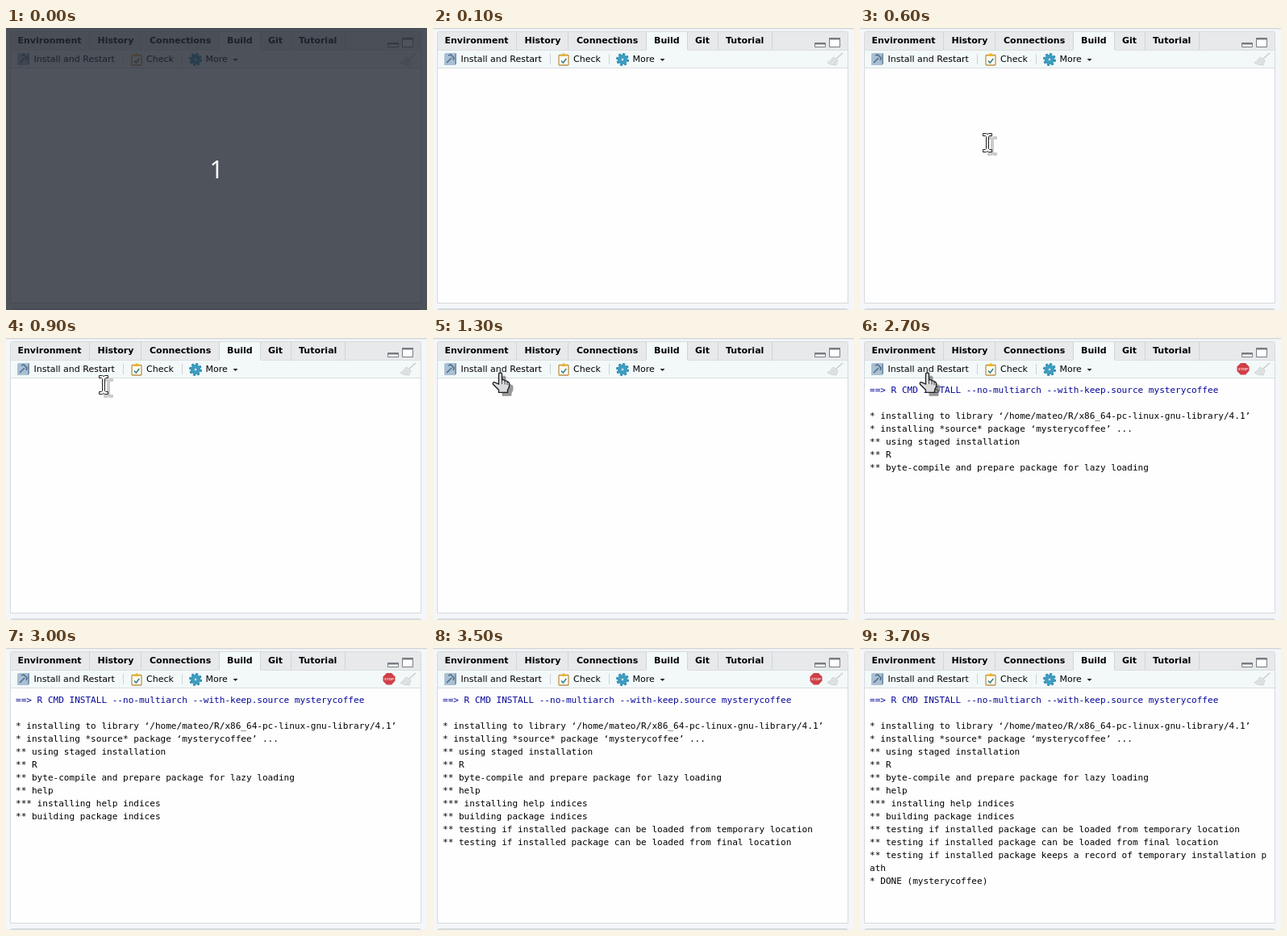
An HTML page that plays this animation: 522x349 px, repeating every 6.2 s.

```html
<!DOCTYPE html>
<html lang="en">
<head>
<meta charset="utf-8">
<title>Build pane</title>
<style>
  html, body { margin: 0; width: 100%; height: 100%; overflow: hidden; background: #f4f6f9; }
  svg { display: block; }
  text { font: 11px "DejaVu Sans", sans-serif; white-space: pre; }
  #tabs text { font-weight: bold; }
  #log text { font: 11.06px "DejaVu Sans Mono", monospace; }
  #log text:first-child { fill: #08089a; }
  #count text { font: 30px "Noto Sans", sans-serif; fill: #fff; }
  #stop text { font: bold 4px "DejaVu Sans", sans-serif; fill: #f6d5d6; }
</style>
</head>
<body>
<svg width="522" height="349" viewBox="0 0 522 349">
  <defs>
    <path id="handShape" d="M8.5 15V3q0-2 2-2t2 2v7q3-1 3.500 1 3-.7 3 1.300 2.500-.3 2.500 2v4l-2 4v3H8.500v-3l-7-7q-1-3 2-2.500z"/>
    <path id="beamShape" d="M.5.5h4l1.500 1 1.500-1h4v3h-3l-1 1v15l1 1h3v3h-4l-1.500-1-1.500 1h-4v-3h3l1-1v-15l-1-1h-3z"/>
  </defs>

  <path d="M0 .5H522" stroke="#d3d6da"/>
  <path d="M0 1.500H522" stroke="#e8eaed"/>
  <path d="M5.500 340.500V6.500q0-2 2-2H512.500q2 0 2 2V340.500z" fill="#fefefe" stroke="#d5dadd"/>
  <path d="M6 5H514V27H6z" fill="#e7e9eb"/>
  <path d="M6 27H514V49H6z" fill="#f3f8f9"/>
  <path d="M6 27.500H264M316 27.500H514M6 49.500H514" stroke="#d9dee1"/>
  <path d="M265 5h50v23h-50z" fill="#f3f8f9"/>
  <path d="M103.500 5V27M167.500 5V27M264.500 5V27M315.500 5V27M353.500 5V27M420.500 5V27" stroke="#d2d6d9"/>
  <path d="M5 349v-.5H515M7 347.500H513" stroke="#d5dadd" fill="none"/>
  <g id="tabs"></g>

  <g fill="#fff" stroke="#777c82">
    <path d="M473.500 18.500h13v5h-13z"/>
    <path d="M491.500 12.500h13v11h-13z"/>
    <path d="M473 19.500h14M491 13.500h14" stroke-width="2"/>
  </g>
  <path d="M145.500 32V45M218.500 32V45" stroke="#cdd2d5"/>
  <text x="34.500" y="42">Install and Restart</text>
  <text x="174" y="42">Check</text>
  <text x="247.500" y="42">More</text>
  <path d="M281.500 38h6l-3 3z" fill="#222"/>

  <!-- install -->
  <path d="M14 32l2-1h13v13l-2 2H14z" fill="#a9bfd3"/>
  <path d="M27 33l2-2v13l-2 2z" fill="#7894ad"/>
  <path d="M17 43l6-6M19 34l3-1 4 4-1 3" fill="none" stroke="#526e89" stroke-width="1.600"/>
  <!-- check -->
  <rect x="156" y="33.500" width="12" height="12.500" rx="1" fill="#fffdf5" stroke="#bd9148" stroke-width="1.300"/>
  <path d="M158.500 35v-2l2-.5q1.500-3 3 0l2 .5v2z" fill="#e9b52d"/>
  <path d="M159 40.500l2.300 2.500 4-5" fill="none" stroke="#2e7f86" stroke-width="1.500"/>
  <!-- more -->
  <g fill="none" stroke="#2b88ad">
    <circle cx="235" cy="39" r="6.700" stroke-width="2.600" stroke-dasharray="2.900 2.362"/>
    <circle cx="235" cy="39" r="4" stroke="#3c9dc0" stroke-width="4.500"/>
    <circle cx="235" cy="39" r="1.700" fill="#e4f3f7" stroke-width=".7"/>
  </g>
  <!-- clear -->
  <path d="M500 38l8-7" stroke="#c9cccd" stroke-width="1.500"/>
  <path d="M496 36l6 4-2 6q-7 0-11-3 4-2 7-7z" fill="#e2e4e4" stroke="#c8cccd" stroke-width=".8"/>
  <path d="M493 43l4-4M497 44.500l2-4" stroke="#c8cccd" stroke-width=".7"/>

  <g id="stop">
    <path d="M472 31h6l4.500 4.500v5L478 45.500h-6l-4.500-4.500v-5.500z" fill="#cf3f46"/>
    <text x="475" y="40" text-anchor="middle">STOP</text>
  </g>
  <g id="log"></g>

  <g id="beam">
    <use href="#beamShape" x="6" y="4" fill="#bbb" stroke="#bbb" opacity=".75"/>
    <use href="#beamShape" fill="#fff" stroke="#222"/>
  </g>
  <g id="hand">
    <use href="#handShape" x="4.500" y="4" fill="#555" stroke="#555" opacity=".6"/>
    <use href="#handShape" fill="#d9dbdd" stroke="#1c1c1c" stroke-width="1.300"/>
    <path d="M12.500 10v5M16 11.500v4M19 13v3" stroke="#333" stroke-width=".9"/>
  </g>

  <g id="count">
    <path d="M0 0H522V349H0z" fill="#242832" opacity=".8"/>
    <text x="261" y="185.500" text-anchor="middle">1</text>
  </g>
</svg>
<script>
const LOOP = 6200;
const $ = id => document.getElementById(id);

function addText(parent, x, y, content) {
  const node = document.createElementNS("http://www.w3.org/2000/svg", "text");
  node.setAttribute("x", x);
  node.setAttribute("y", y);
  node.textContent = content;
  return parent.appendChild(node);
}

const tabs = { Environment: 14.5, History: 113.5, Connections: 178, Build: 274, Git: 325, Tutorial: 363 };
for (const name in tabs) addText($("tabs"), tabs[name], 19, name);

// Each group of output lines appears at once.
const output = [
  [2400, "==> R CMD INSTALL --no-multiarch --with-keep.source mysterycoffee", ""],
  [2700, "* installing to library ‘/home/mateo/R/x86_64-pc-linux-gnu-library/4.1’",
    "* installing *source* package ‘mysterycoffee’ ...",
    "** using staged installation", "** R",
    "** byte-compile and prepare package for lazy loading"],
  [2900, "** help", "*** installing help indices"],
  [3000, "** building package indices"],
  [3200, "** testing if installed package can be loaded from temporary location"],
  [3500, "** testing if installed package can be loaded from final location"],
  [3700, "** testing if installed package keeps a record of temporary installation p",
    "ath", "* DONE (mysterycoffee)"],
];
const lines = output
  .flatMap(([start, ...group]) => group.map(content => ({ start, content })))
  .map(({ start, content }, i) => ({ start, node: addText($("log"), 12, 68 + 16 * i, content) }));

// Pointer stops: start time, left, top.
const beamStops = [[500, 206, 196], [600, 152, 130], [700, 112, 86], [800, 105, 62], [900, 115, 46]];
const handStops = [[1100, 86, 48], [1300, 73, 42], [2900, 75, 31]];

function show(node, visible) {
  node.style.display = visible ? "" : "none";
}

function place(node, stops, end, t) {
  const stop = stops.findLast(([start]) => t >= start);
  show(node, stop && t < end);
  if (stop) node.setAttribute("transform", `translate(${stop[1]} ${stop[2]})`);
}

function render(t) {
  show($("count"), t < 100);
  show($("stop"), t >= 2400 && t < 3700);
  for (const { start, node } of lines) show(node, t >= start);
  place($("beam"), beamStops, 1100, t);
  place($("hand"), handStops, 3000, t);
}

const begin = performance.now();
function tick() {
  render((performance.now() - begin) % LOOP);
  requestAnimationFrame(tick);
}
tick();
</script>
</body>
</html>
```
